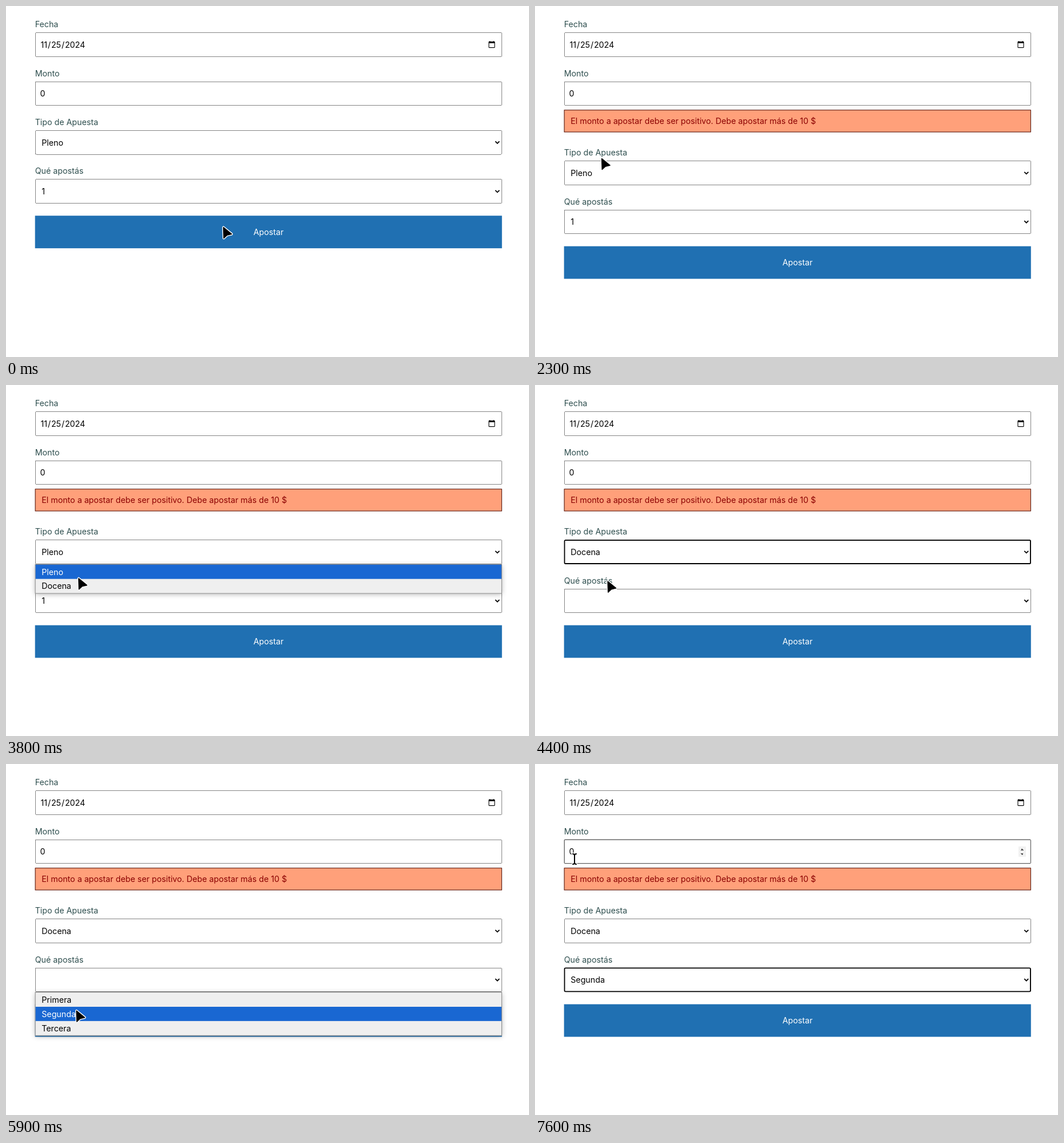
Recreate the animation shown at these times as an HTML page. Size 913 by 613 pixels, loop 8000 ms.

```html
<!DOCTYPE html>
<html lang="es">
<head>
<meta charset="utf-8">
<style>
html, body { margin: 0; width: 100%; height: 100%; overflow: hidden; background: #fff; }
body { position: relative; pointer-events: none; }
#page {
  position: absolute; left: 0; top: 0; width: 1027px; height: 689px;
  transform: scale(calc(8 / 9)); transform-origin: 0 0; font: 16px Inter, sans-serif;
}
#page > div { position: absolute; left: 57px; width: 917px; box-sizing: border-box; }
.field { height: 48px; }
.field label { position: absolute; left: 0; top: -28px; line-height: 24px; color: #2f4f4f; white-space: nowrap; }
.field input, .field select {
  display: block; box-sizing: border-box; width: 100%; height: 100%; margin: 0;
  padding: 8px; font: inherit; color: #000; outline: none;
}
.field::after { content: ""; position: absolute; inset: 0; box-sizing: border-box; }
.hover::after { border: 1px solid #4f4f4f; border-radius: 2px; }
.focus::after { border: 2px solid #000; border-radius: 3px; }
input::-webkit-inner-spin-button { opacity: 0; }
.hover input::-webkit-inner-spin-button { opacity: 1; }
#error {
  top: 204px; height: 44px; line-height: 42px; padding-left: 12px;
  background: #ffa07a; border: 1px solid #300; color: #8b0000;
}
#button { height: 64px; line-height: 64px; text-align: center; background: #2070b2; color: #fff; }
#list { background: #efefef; border: 1px solid #767676; box-shadow: 0 2px 10px rgba(0, 0, 0, .3); }
#list div { height: 28px; line-height: 28px; padding-left: 12px; color: #000; }
#list .on { background: #1967d2; color: #fff; }
#pointer { position: absolute; left: 0; top: 0; overflow: visible; stroke-linejoin: round; stroke-linecap: round; }
</style>
</head>
<body>
<div id="page">
  <div class="field"><label>Fecha</label><input type="date" lang="en-US" value="2024-11-25"></div>
  <div class="field"><label>Monto</label><input type="number" value="0"></div>
  <div class="field"><label>Tipo de Apuesta</label><select><option></option></select></div>
  <div class="field"><label>Qué apostás</label><select><option></option></select></div>
  <div id="error">El monto a apostar debe ser positivo. Debe apostar más de 10 $</div>
  <div id="button">Apostar</div>
  <div id="list"></div>
</div>
<svg id="pointer" width="1" height="1">
  <defs>
    <path id="arrowShape" d="M.6.6 1.2 19.4 6.8 14.2 14.9 12.3Z"/>
    <path id="beamShape" fill="none" d="M-3-9Q0-9 0-6Q0-9 3-9M0-6V6M-3 9Q0 9 0 6Q0 9 3 9"/>
  </defs>
  <g id="arrow">
    <use href="#arrowShape" stroke="#fff" stroke-width="4.4"/>
    <use href="#arrowShape" stroke="#000" stroke-width="1.6"/>
  </g>
  <g id="beam">
    <use href="#beamShape" stroke="#fff" stroke-width="4.6"/>
    <use href="#beamShape" stroke="#000" stroke-width="2"/>
  </g>
</svg>
<script>
const LOOP = 8000, STEP = 100, SCALE = 8 / 9;
const TOP = 52, PITCH = 96, FIELD = 48, ROW = 28, ERROR_SPACE = 60;
const FAIL = 1100, TYPE_OPEN = 3200, TYPE_PICK = 4400, BET_OPEN = 5100, BET_PICK = 6700;

const $ = id => document.getElementById(id);
const fields = [...document.querySelectorAll(".field")];
const options = [...document.querySelectorAll("option")];

// Each move eases the pointer to a place, optionally along an arch
const moves = [
  { from: 100, to: 500, x: 452.5, y: 398 },
  { from: 1400, to: 2300, x: 116, y: 266, arch: 255 },
  { from: 2500, to: 2900, x: 124, y: 292.5 },
  { from: 3400, to: 3900, x: 126.5, y: 342.5 },
  { from: 4500, to: 4800, x: 123, y: 372 },
  { from: 5400, to: 5900, x: 122.5, y: 430.5 },
  { from: 6800, to: 7600, x: 69, y: 166 }
];

function pointerAt(t) {
  let x = 379, y = 386;
  for (const m of moves) {
    const u = Math.min(1, Math.max(0, (t - m.from) / (m.to - m.from)));
    const k = u * u * (3 - 2 * u);
    x += (m.x - x) * k;
    y += (m.y - y) * k - (m.arch || 0) * Math.sin(Math.PI * k);
  }
  return [x, y];
}

const show = (id, on) => $(id).style.display = on ? "" : "none";
const place = (el, top) => el.style.top = top + "px";

function drawList(top, names, y) {
  const row = Math.floor((y / SCALE - top - 1) / ROW);
  place($("list"), top);
  $("list").innerHTML = names.map((n, i) => `<div class="${i === row ? "on" : ""}">${n}</div>`).join("");
}

function draw(t) {
  const [x, y] = pointerAt(t);
  const failed = t >= FAIL;
  const typeOpen = t >= TYPE_OPEN && t < TYPE_PICK, betOpen = t >= BET_OPEN && t < BET_PICK;
  const open = typeOpen || betOpen;
  const focused = t >= BET_PICK ? 3 : t >= TYPE_PICK && t < BET_OPEN ? 2 : -1;
  const topOf = i => TOP + i * PITCH + (failed && i > 1 ? ERROR_SPACE : 0);
  const hovered = open ? -1 : fields.findIndex((f, i) => {
    const inside = y / SCALE - topOf(i);
    return inside >= 0 && inside < FIELD;
  });

  fields.forEach((f, i) => {
    place(f, topOf(i));
    f.classList.toggle("hover", i === hovered);
    f.classList.toggle("focus", i === focused);
  });
  place($("button"), topOf(3) + 72);
  options[0].textContent = t < TYPE_PICK ? "Pleno" : "Docena";
  options[1].textContent = t < TYPE_PICK ? "1" : t < BET_PICK ? "" : "Segunda";

  if (typeOpen) drawList(topOf(2) + FIELD, ["Pleno", "Docena"], Math.max(y, 314));
  if (betOpen) drawList(topOf(3) + FIELD, ["Primera", "Segunda", "Tercera"], y);

  const typing = hovered === 0 || hovered === 1;
  show("error", failed);
  show("list", open);
  show("arrow", !typing);
  show("beam", typing);
  $("pointer").style.transform = `translate(${x}px, ${y}px)`;
}

let last = -1;
const start = performance.now();
function frame() {
  const t = Math.floor(((performance.now() - start) % LOOP) / STEP) * STEP;
  if (t !== last) draw(last = t);
  requestAnimationFrame(frame);
}
frame();
</script>
</body>
</html>
```
